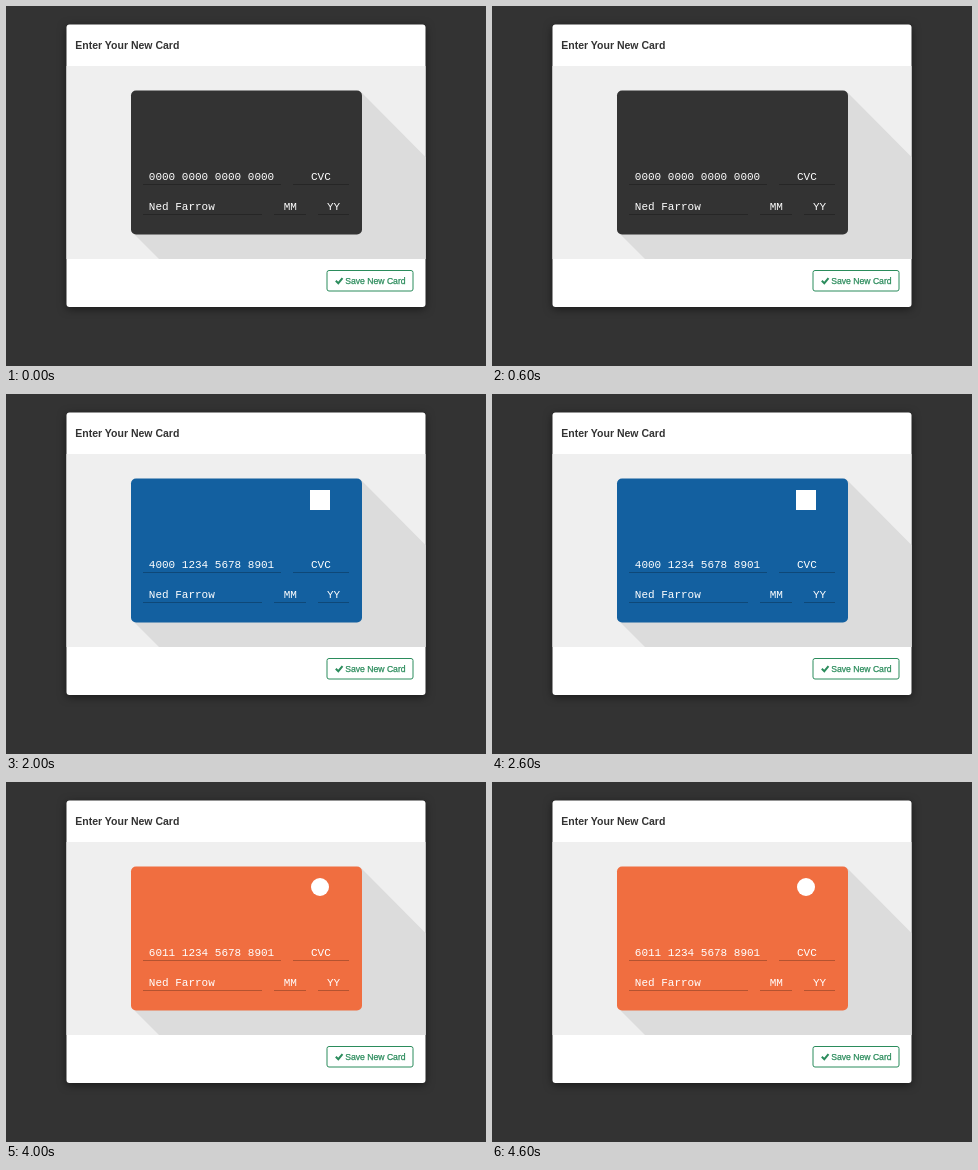
An HTML page for the animation above (5 s loop, 480x360 px).

```html
<!DOCTYPE html>
<html lang="en">
<head>
<meta charset="utf-8">
<title>Card form</title>
<style>
  html, body { margin: 0; width: 100%; height: 100%; overflow: hidden; background: #333; }
  svg { display: block; width: 480px; height: 360px; }
  text { font-family: "Liberation Sans", Arial, sans-serif; white-space: pre; }
  .modal { filter: drop-shadow(0 2px 4px rgba(0, 0, 0, .5)); }
  .fields text { font: 11px "Liberation Mono", "Courier New", monospace; fill: #fff; }
  .lines { stroke: #000; stroke-opacity: .25; }
  .save { fill: #2b8c5c; stroke: #2b8c5c; }
</style>
</head>
<body>
<svg viewBox="0 0 480 360">
  <rect class="modal" x="60.5" y="18.5" width="359" height="282.5" rx="3" fill="#fff"/>
  <text x="69.3" y="43" font-size="10.5" font-weight="bold" fill="#333">Enter Your New Card</text>

  <rect x="60.5" y="60" width="359" height="193" fill="#efefef"/>
  <path d="M354 85L419.5 151V253H153L127 227Z" fill="#dcdcdc"/>
  <rect id="card" x="125" y="84.5" width="231" height="144" rx="5"/>
  <rect id="logo" fill="#fff"/>

  <path class="lines" d="M137 178.5H275M287 178.5H343M137 208.5H256M268 208.5H300M312 208.5H343"/>
  <g class="fields">
    <text id="number" x="142.8" y="173.5"></text>
    <text x="305" y="173.5">CVC</text>
    <text x="142.8" y="203.5">Ned Farrow</text>
    <text x="277.7" y="203.5">MM</text>
    <text x="321" y="203.5">YY</text>
  </g>
  <path id="caret" d="M156.5 164V176" stroke="#fff"/>

  <g class="save">
    <rect x="321" y="264.5" width="86" height="20.5" rx="2" fill="#fff"/>
    <path d="M329.8 274.8L332.3 277.2L336.5 272.2" fill="none" stroke-width="2"/>
    <text x="339.2" y="278" font-size="8.65" stroke-width=".25">Save New Card</text>
  </g>
</svg>
<script>
  const $ = id => document.getElementById(id);
  const HOLD = 1000;

  // Logo stand-ins are centred at x = 314, hanging from y = 96.
  const cards = [
    { color: '#333', number: '0000', rest: ' 0000 0000 0000', size: 0 },
    { color: '#39aee4', number: '3400', size: 23 },
    { color: '#1360a0', number: '4000', size: 20 },
    { color: '#fbb14d', number: '5400', size: 36, round: true, caret: true },
    { color: '#f06e40', number: '6011', size: 18, round: true }
  ];

  function set(el, attrs) {
    for (const key in attrs) el.setAttribute(key, attrs[key]);
  }

  function show({ color, number, rest = ' 1234 5678 8901', size, round, caret }) {
    set($('card'), { fill: color });
    set($('logo'), { x: 314 - size / 2, y: 96, width: size, height: size, rx: round ? size / 2 : 0 });
    $('number').textContent = number + rest;
    set($('caret'), { visibility: caret ? 'visible' : 'hidden' });
  }

  const start = performance.now();
  let current;

  function tick() {
    const index = Math.floor((performance.now() - start) / HOLD) % cards.length;
    if (index !== current) show(cards[current = index]);
    requestAnimationFrame(tick);
  }
  tick();
</script>
</body>
</html>
```
